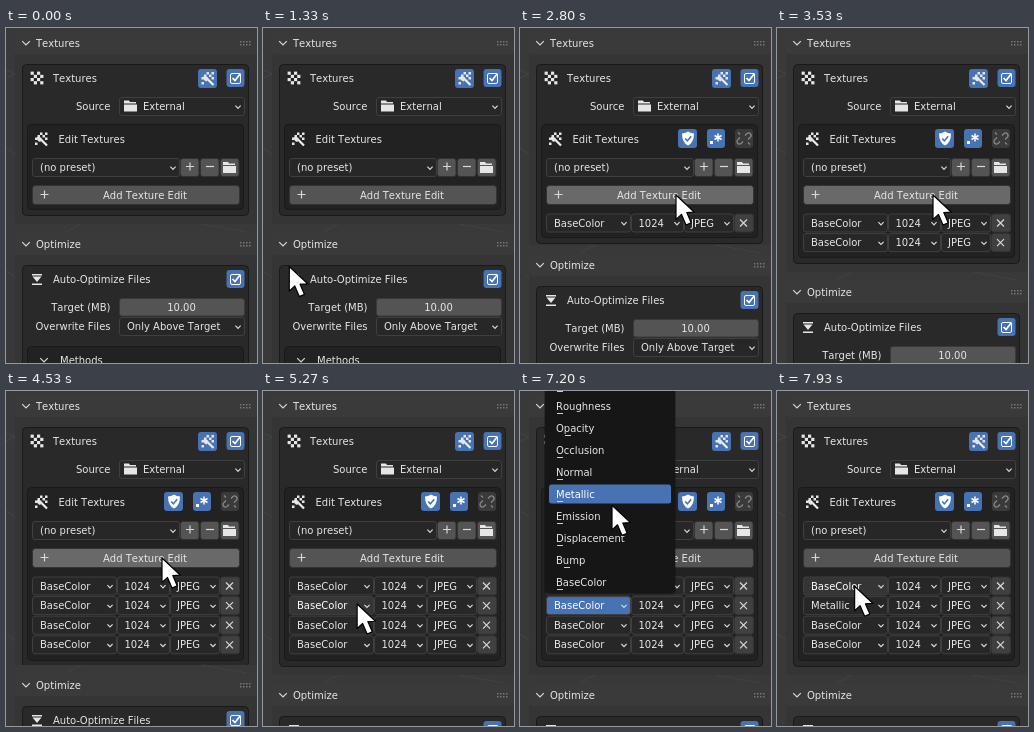
An HTML page that plays this animation: 251 by 335 pixels, repeating every 8 s.

```html
<!DOCTYPE html>
<html lang="en">
<head>
<meta charset="utf-8">
<title>Texture edits</title>
<style>
  html, body { margin: 0; width: 100%; height: 100%; overflow: hidden; background: #393939; }
  svg { display: block; width: 100vw; height: 100vh; }
  text { font: 10px "DejaVu Sans", sans-serif; font-kerning: none; fill: #e6e6e6; white-space: pre; }
</style>
</head>
<body>
<svg id="stage" viewBox="0 0 251 335"></svg>
<script>
const LOOP = 8000, FPS = 15;
const BLUE = '#4772b3', FIELD = '#545454', HOVER = '#696969', MENU = '#272727', EDGE = '#3f3f3f';
const stage = document.getElementById('stage');

// press time, time the row appears, steps the panel below takes to settle
const CLICKS = [[2530, 2670, 4], [3270, 3400, 3], [3800, 3930, 3], [4400, 4530, 2]];
const MENU_PRESS = 5530, MENU_OPEN = 5600, MENU_CLOSE = 7530;

const easeOut = p => 1 - (1 - p) ** 2;
const easeInOut = p => p < .5 ? 4 * p ** 3 : 1 - 4 * (1 - p) ** 3;

// start, end, target x, target y, easing
const MOVES = [
  [1270, 2000, 156, 166, easeOut],
  [4800, 5400, 91.5, 214, easeInOut],
  [6200, 7200, 92, 113.4, easeInOut],
  [7470, 8000, 77.5, 195, easeInOut]
];

// label and offset of its underlined letter, from the bottom up
const ITEMS = [['BaseColor', 0], ['Bump', 7], ['Displacement', 0], ['Emission', 0], ['Metallic', 0],
  ['Normal', 0], ['Occlusion', 0], ['Opacity', 8], ['Roughness', 0], ['Specular', 0]];

const rect = (x, y, w, h, fill, r = 0, stroke = '') =>
  stroke
    ? `<rect x="${x + .5}" y="${y + .5}" width="${w - 1}" height="${h - 1}" rx="${r}" fill="${fill}" stroke="${stroke}"/>`
    : `<rect x="${x}" y="${y}" width="${w}" height="${h}" rx="${r}" fill="${fill}"/>`;
const text = (s, x, y, anchor = 'start', fill = '#e6e6e6') =>
  `<text x="${x}" y="${Math.round(y + 3.5)}" text-anchor="${anchor}" style="fill:${fill}">${s}</text>`;
const line = (d, w = 1.2, color = '#d8d8d8') =>
  `<path d="${d}" fill="none" stroke="${color}" stroke-width="${w}"/>`;
const shape = (d, fill = '#e6e6e6', extra = '') => `<path d="${d}" fill="${fill}" ${extra}/>`;
const at = (x, y, s) => `<g transform="translate(${x} ${y})">${s}</g>`;

const chevron = (x, y, r = 2.6) => line(`M${x - r} ${y - r / 2}l${r} ${r}l${r} ${-r}`);
const plus = (x, y) => line(`M${x - 4} ${y}h8M${x} ${y - 4}v8`);
const cross = (x, y) => line(`M${x - 3.5} ${y - 3.5}l7 7m0 -7l-7 7`);
const folder = (x, y) => at(x, y, shape('M-6.5 -5.5h5l1 1.5h6v1.5h-12zM-6.5 -1.5h13v7h-13z'));

function checker(x, y) {
  let s = rect(-6.5, -6.5, 13, 13, '#222');
  for (let i = 0; i < 16; i++) {
    const col = i % 4, row = i >> 2;
    if ((col + row) % 2 === 0) s += rect(col * 3.2 - 6.4, row * 3.2 - 6.4, 3.2, 3.2, '#e6e6e6');
  }
  return at(x, y, s);
}

function brush(x, y) {
  let s = '';
  for (const [a, b] of [[-1, -6.5], [4, -6.5], [1.5, -4], [-3.5, -4], [4, -1.5], [-6, -1.5], [-6, 3.5]])
    s += rect(a, b, 2.5, 2.5, '#e6e6e6');
  return at(x, y, s + line('M0.5 1L6 6.5', 2.2, '#eee') + shape('M-4 -2q4 -1 5.5 2.5l-2.5 2.5q-3.500 -1 -3 -5z'));
}

const checkbox = y => rect(220.5, y - 9, 18, 18, BLUE, 3) +
  rect(224, y - 5, 11, 11, 'none', 1.5, '#fff') + line(`M226.500 ${y}l2.500 2.500l5.500 -7`, 1.7, '#fff');

function dropdown(label, x, y, w, tx, state = '') {
  const fill = state === 'on' ? BLUE : state === 'hover' ? '#353535' : MENU;
  return rect(x, y - 9.5, w, 19, fill, 2.5, EDGE) +
    text(label, tx, y, 'start', state ? '#fff' : '#e6e6e6') + chevron(x + w - 7, y + .5);
}

function header(label, y) {
  let s = rect(9, y - 11, 242, 22, '#3a3a3a', 3) + chevron(20, y, 3.8) + text(label, 30, y);
  for (let i = 0; i < 8; i++) s += rect(234 + (i >> 1) * 3, y - 2 + i % 2 * 3, 1.5, 1.5, '#777');
  return s;
}

const box = (x, y, w, h, fill) => rect(x, y, w, h, fill, 4, '#191919');

function editIcons() {
  return rect(158, 101, 19, 19, BLUE, 3) + rect(187, 101, 18, 19, BLUE, 3) + rect(215, 101, 18, 19, '#3a3a3a', 3) +
    at(168, 110.5, shape('M0 -7q3 2 6 2q0 9 -6 12q-6 -3 -6 -12q3 0 6 -2z', '#fff') + line('M-2.8 0l2.2 2.4l3.8 -4.6', 1.6, BLUE)) +
    at(196, 110.5, rect(-6, 2.5, 3, 3, '#fff') + line('M2 -5v8M-1.5 -3l7 4M-1.5 1l7 -4', 1.5, '#fff')) +
    at(224, 110.5, line('M-1 3l-2 2a2.5 2.5 0 0 1 -3 -4l2 -2M1 -3l2 -2a2.5 2.5 0 0 1 3 4l-2 2M-4 -4l-2 -2M4 4l2 2', 1.3, '#888'));
}

const rowY = i => 195 + 19.6 * i;
const restY = n => n ? 224 + 20 * n : 216;

function texturesPanel(T, n, pos) {
  const end = restY(n);
  const menuOn = T >= MENU_OPEN && T < MENU_CLOSE;
  const over = (x0, x1, y0, y1) => pos && !menuOn && pos.x >= x0 && pos.x < x1 && pos.y >= y0 && pos.y < y1;
  const pressed = CLICKS.some(c => T >= c[0] && T < c[1]);
  let s = rect(9, 4, 242, end - 24, '#353535', 3) + header('Textures', 15) +
    box(16, 36, 227, end - 64, '#292929') +
    checker(31, 50) + text('Textures', 47, 50) +
    rect(192, 41, 19, 19, BLUE, 3) + brush(201.5, 50.5) + checkbox(50) +
    text('Source', 104.5, 78, 'end') + dropdown('External', 113, 78.5, 126, 137) + folder(124.5, 78) +
    box(21, 96, 217, end - 130, '#222') +
    brush(35, 111) + text('Edit Textures', 52.5, 111) + (n ? editIcons() : '') +
    dropdown('(no preset)', 26, 139.5, 148, 34);
  for (const x of [174, 194, 214]) s += rect(x, 130, 19.5, 19, FIELD, 2.5, '#333');
  s += plus(184, 138.5) + line('M200 138.5h8') + folder(223.5, 139.5) +
    rect(26, 157, 208, 20, pressed ? BLUE : over(26, 234, 157, 177) ? HOVER : FIELD, 3, '#333') +
    plus(38.5, 166.5) + text('Add Texture Edit', 139, 167, 'middle');
  for (let i = 0; i < n; i++) {
    const y = rowY(i);
    const open = i === 1 && T >= MENU_PRESS && T < MENU_CLOSE;
    const state = open ? 'on' : over(26, 111, y - 9.8, y + 9.8) ? 'hover' : '';
    const name = i === 1 && T >= MENU_CLOSE ? 'Metallic' : 'BaseColor';
    s += dropdown(name, 26, y, 85, 34, state) + dropdown('1024', 111, y, 53, 118.5) +
      dropdown('JPEG', 164, y, 50, 171) + rect(214, y - 9.5, 20, 19, '#404040', 2.5, '#333') + cross(223.5, y);
  }
  return s;
}

function optimizePanel(y) {
  return at(0, y, rect(0, -20, 251, 30, '#393939') + line('M60 -12L75 -20M196 -20L240 -12', 1, '#424242') +
    rect(9, -11, 242, 200, '#353535', 3) + header('Optimize', 0) +
    box(16, 21, 227, 200, '#292929') +
    shape('M26 30h10v1.5h-10zM26.5 32.5h9l-4.5 5.5zM26 39.5h10v1.5h-10z') +
    text('Auto-Optimize Files', 47, 35) + checkbox(35) +
    text('Target (MB)', 104.5, 63, 'end') + rect(113, 54, 126, 18.5, FIELD, 2.5, '#3a3a3a') + text('10.00', 175.5, 63, 'middle') +
    text('Overwrite Files', 104.5, 82, 'end') + dropdown('Only Above Target', 113, 82.5, 126, 121) +
    box(21, 102, 217, 100, '#222') + chevron(38, 116, 3.8) + text('Methods', 54, 116));
}

function popup(pos) {
  const active = Math.max(0, Math.min(8, Math.round((191 - pos.y) / 22)));
  let s = rect(24, -10, 132, 214, 'rgba(0,0,0,.25)', 5) + rect(25, -10, 130, 212, '#161616', 4);
  ITEMS.forEach(([label, off], i) => {
    const y = 191 - 22 * i, on = i === active;
    if (on) s += rect(29, y - 9.5, 122, 19, BLUE, 2.5);
    s += text(label, 36, y, 'start', on ? '#fff' : '#e6e6e6') + rect(37 + off, y + 7, 6, 1, '#d0d0d0');
  });
  return s;
}

const pointer = ({ x, y }) => at(x.toFixed(2), y.toFixed(2),
  shape('M0 1V25.5L5.5 20.4L10 31L15.2 28.8L10.8 18.6L18.4 18.2Z', '#fff', 'stroke="#000" stroke-width="1.2" stroke-linejoin="round"'));

function pointerAt(T) {
  if (T < MOVES[0][0]) return null;
  let x = 2, y = 251;
  for (const [t0, t1, tx, ty, ease] of MOVES) {
    const p = ease(Math.max(0, Math.min(1, (T - t0) / (t1 - t0))));
    x += (tx - x) * p;
    y += (ty - y) * p;
  }
  return { x, y };
}

function panelY(T, n) {
  if (!n) return restY(0);
  const [, added, steps] = CLICKS[n - 1];
  const done = Math.floor((T - added + 5) * FPS / 1000) + 1;
  return Math.round(restY(n - 1) + (restY(n) - restY(n - 1)) * Math.min(1, done / steps));
}

function draw(T) {
  const n = CLICKS.filter(c => T >= c[1]).length;
  const pos = pointerAt(T);
  stage.innerHTML = rect(0, 0, 251, 335, '#393939') +
    line('M0 42L9 46L0 50M0 120L9 126M0 243L9 249', 1, '#444') +
    texturesPanel(T, n, pos) + optimizePanel(panelY(T, n)) +
    (T >= MENU_OPEN && T < MENU_CLOSE ? popup(pos) : '') +
    (pos ? pointer(pos) : '');
}

let last = -1;
function tick() {
  const step = Math.floor((performance.now() % LOOP + 5) * FPS / 1000) % (LOOP * FPS / 1000);
  if (step !== last) {
    last = step;
    draw(Math.round(step * 100 / FPS) * 10);
  }
  requestAnimationFrame(tick);
}
tick();
</script>
</body>
</html>
```
